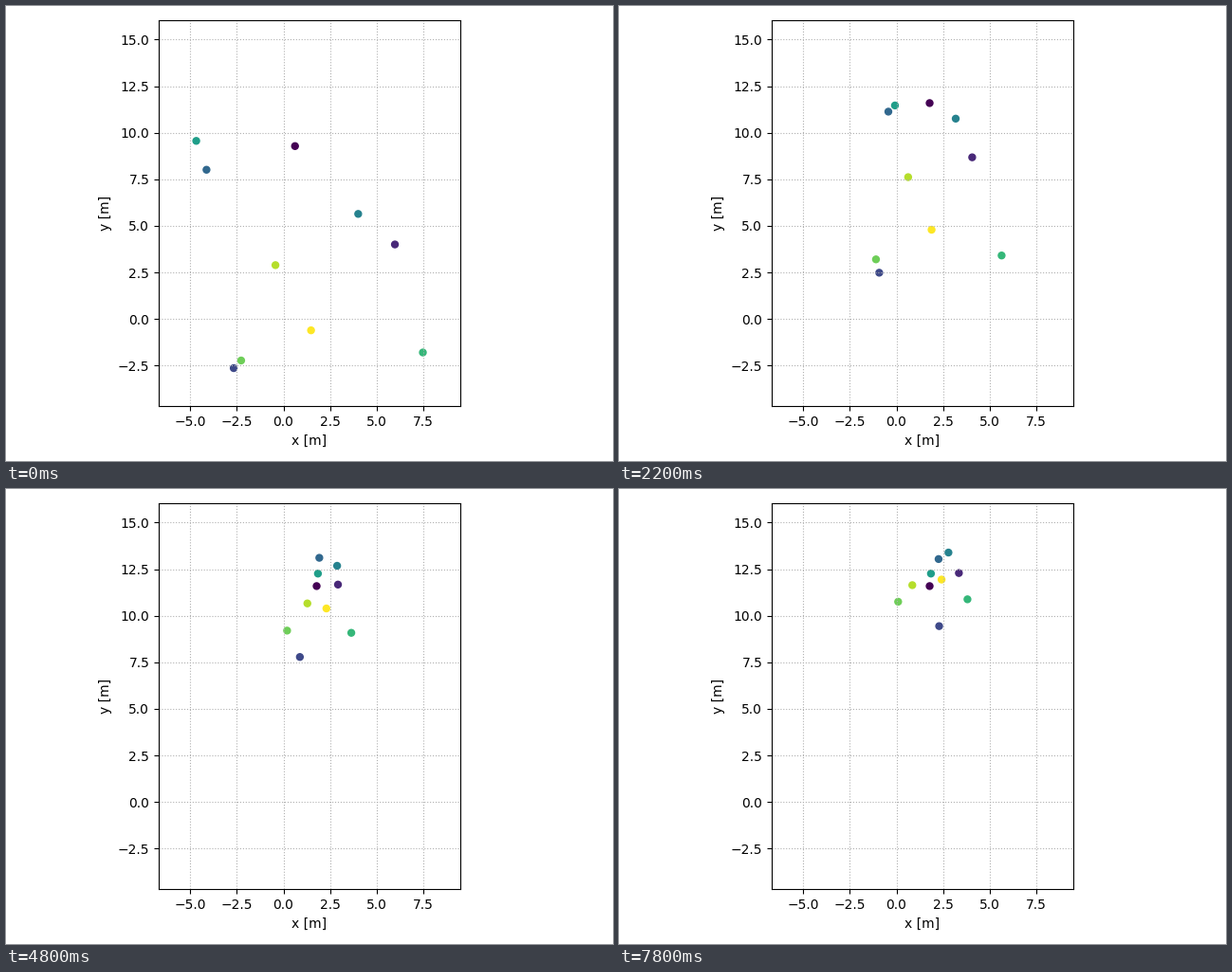
A matplotlib script that plays this animation: 640x480 px, repeating every 8000 ms.

```python
import numpy as np
import matplotlib.pyplot as plt
from matplotlib.animation import FuncAnimation

W, H, DPI = 640, 480, 100
FRAMES, STEP_MS = 40, 200
SCALE = 19.65                 # pixels per metre
X0, Y0 = 292.55, 330.15       # stage position of the point (0, 0)
LEFT, RIGHT, TOP, BOTTOM = 161, 479, 15, 422.15
PACE = 0.52                   # metres per step when nobody is in the way

# Start, place in the queue, step of arrival there, place at the end (metres)
WALKERS = [
    ((0.62, 9.28), (1.78, 11.59), 5, None),
    ((5.98, 4.00), (2.87, 11.59), 20, (3.35, 12.29)),
    ((-2.67, -2.64), (1.38, 9.25), 28, (2.29, 9.44)),
    ((-4.13, 8.01), (1.91, 13.11), 22, (2.26, 13.04)),
    ((4.01, 5.64), (2.92, 12.35), 15, (2.79, 13.39)),
    ((-4.68, 9.56), (1.85, 12.26), 17, None),
    ((7.48, -1.80), (3.64, 9.08), 24, (3.81, 10.88)),
    ((-2.27, -2.23), (0.48, 10.52), 27, (0.09, 10.75)),
    ((-0.43, 2.89), (1.30, 10.62), 22, (0.85, 11.64)),
    ((1.48, -0.61), (2.42, 11.94), 28, None),
]


def position(step, start, queue, arrival, end):
    """Set out at the common pace, slow down into the queue, then shuffle on."""
    start, queue = np.array(start), np.array(queue)
    if step <= arrival:
        u = step / arrival
        slowing = PACE * arrival / np.hypot(*(queue - start)) - 1
        return start + (queue - start) * u * (1 + slowing * (1 - u))
    if end is None:
        return queue
    q = (step - arrival) / (FRAMES - 1 - arrival)
    return queue + (np.array(end) - queue) * q * q * (3 - 2 * q)


def crowd(step):
    return np.array([position(step, *walker) for walker in WALKERS])


fig = plt.figure(figsize=(W / DPI, H / DPI), dpi=DPI)
ax = fig.add_axes([LEFT / W, 1 - BOTTOM / H,
                   (RIGHT - LEFT) / W, (BOTTOM - TOP) / H])
ax.set_xlim((LEFT - X0) / SCALE, (RIGHT - X0) / SCALE)
ax.set_ylim((Y0 - BOTTOM) / SCALE, (Y0 - TOP) / SCALE)
ax.set_xticks(np.arange(-5, 8, 2.5))
ax.set_yticks(np.arange(-2.5, 16, 2.5))
ax.set_xlabel("x [m]")
ax.set_ylabel("y [m]")
ax.grid(linestyle=":")

dots = ax.scatter(*crowd(0).T, s=25, c=np.arange(len(WALKERS)), cmap="viridis")


def update(frame):
    dots.set_offsets(crowd(frame))
    return [dots]


anim = FuncAnimation(fig, update, frames=FRAMES, interval=STEP_MS,
                     repeat=True, repeat_delay=0)
plt.show()
```
